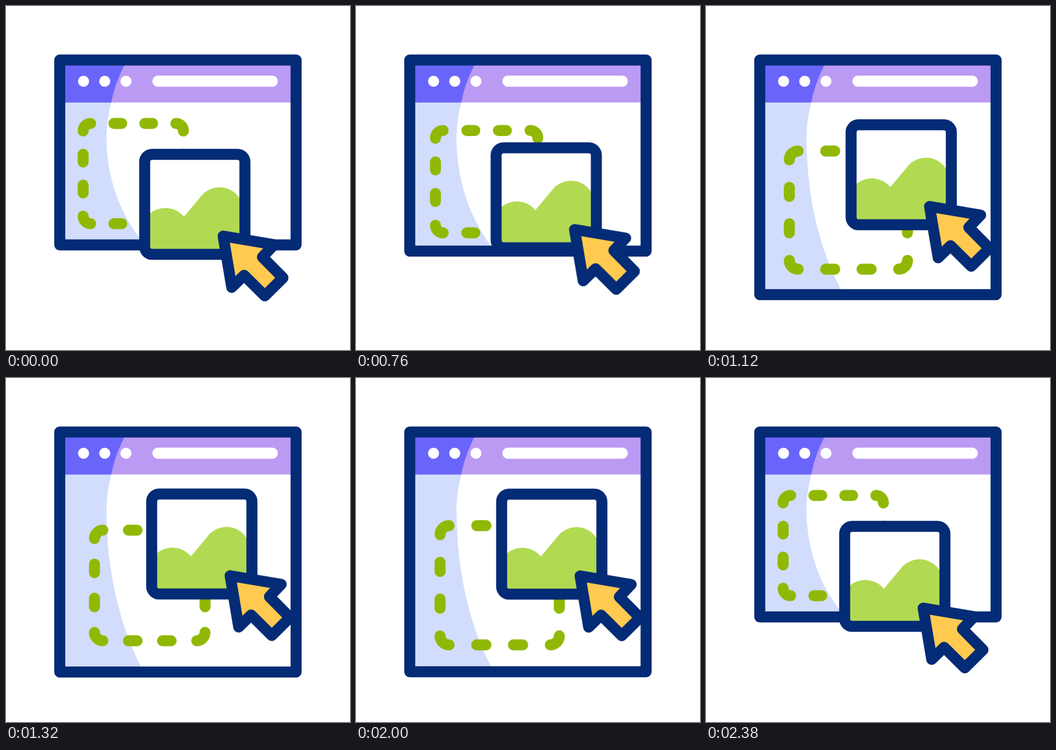
Write an HTML page without scripts that moves like this. It is 640 px wide and 640 px high and loops after 2.4 s.

```html
<!DOCTYPE html>
<html lang="en">
<head>
<meta charset="utf-8">
<title>Drag an image in a window</title>
<style>
  html, body { margin: 0; width: 100%; height: 100%; overflow: hidden; background: #fff; }
  svg { display: block; width: 100vw; height: 100vh; }

  .line { stroke: #042b75; stroke-width: 20.5; stroke-linejoin: round; }
  .dash { fill: none; stroke: #90b804; stroke-width: 20.5; stroke-linecap: round; vector-effect: non-scaling-stroke; }

  .frame, .shade, .drag, .slot, .size, .click {
    animation: 2400ms cubic-bezier(.333, 0, .667, 1) infinite;
  }
  .frame { height: 344px; animation-name: frame; }
  .shade { transform-origin: 0 245px; animation-name: shade; }
  .drag  { animation-name: drag; }
  .slot  { animation-name: slot; }
  .size  { animation-name: size; }
  .click { transform-origin: 460px 484px; animation-name: click; }

  /* the window grows, then shrinks back */
  @keyframes frame {
    0%, 26.46%, 98.75%, 100% { height: 344px; }
    51.54%, 82.7% { height: 446.5px; }
  }
  @keyframes shade {
    0%, 26.46%, 98.75%, 100% { transform: scaleY(1); }
    51.54%, 82.7% { transform: scaleY(1.541); }
  }
  /* picture and pointer travel together */
  @keyframes drag {
    0%, 23.54%, 98.75%, 100% { transform: translate(0, 0); }
    51.75%, 82.7% { transform: translate(13px, -60.2px); }
  }
  /* dashed drop zone */
  @keyframes slot {
    0%, 23.54%, 98.75%, 100% { transform: translate(236.75px, 311.75px); }
    51.75%, 82.7% { transform: translate(267.5px, 386px); }
  }
  @keyframes size {
    0%, 26.83%, 98.75%, 100% { transform: scale(1); }
    50%, 81.67%, 82.7% { transform: scale(1.19); }
    65% { transform: scale(.856); }
  }
  @keyframes click {
    0%, 8.33%, 25%, 100% { transform: scale(1); }
    16.67% { transform: scale(.85); }
  }
</style>
</head>
<body>
<svg viewBox="0 0 640 640">
  <defs>
    <path id="side" class="dash" d="M-93.25-79.25a14 14 0 0 1 14-14M-36-93.25h14.5M21.5-93.25h14.5"/>
  </defs>

  <!-- window -->
  <g fill="#d2ddfd">
    <path d="M105 175H197C190.500 200 187 222 187 245V246H105Z"/>
    <path class="shade" d="M105 245H187C187 320 212 385 251 434.500L255.500 440H105Z"/>
  </g>
  <path fill="#bb9af3" d="M105 105H535V179.500H105Z"/>
  <path fill="#6a65fa" d="M105 105H222.700L220 110.500C208 134 200.500 156 195.800 179.500H105Z"/>
  <g fill="#fff">
    <circle cx="144.300" cy="140" r="10.300"/>
    <circle cx="183.700" cy="140" r="10.300"/>
    <circle cx="223.200" cy="140" r="10.300"/>
    <rect x="272.300" y="129.500" width="233.500" height="20.800" rx="10.400"/>
  </g>
  <rect class="frame line" x="100" y="100.500" width="439.700" height="344" fill="none"/>

  <!-- drop zone -->
  <g class="slot">
    <g class="size">
      <use href="#side"/>
      <use href="#side" transform="rotate(90)"/>
      <use href="#side" transform="rotate(180)"/>
      <use href="#side" transform="rotate(270)"/>
    </g>
  </g>

  <g class="drag">
    <!-- picture -->
    <rect x="258" y="276" width="186.500" height="186" rx="14" fill="#fff"/>
    <path fill="#b1da52" d="M264 389L268 386A45 45 0 0 1 331 392L362 355A44 44 0 0 1 434 357L440 363V458H264Z"/>
    <rect class="line" x="258" y="276" width="186.500" height="186" rx="14" fill="none"/>
    <!-- pointer -->
    <path class="click line" fill="#ffca4f" d="M404 428L499 444L477 467L515.300 505.800L481.500 539.300L443 501L420 523.500Z"/>
  </g>
</svg>
</body>
</html>
```
